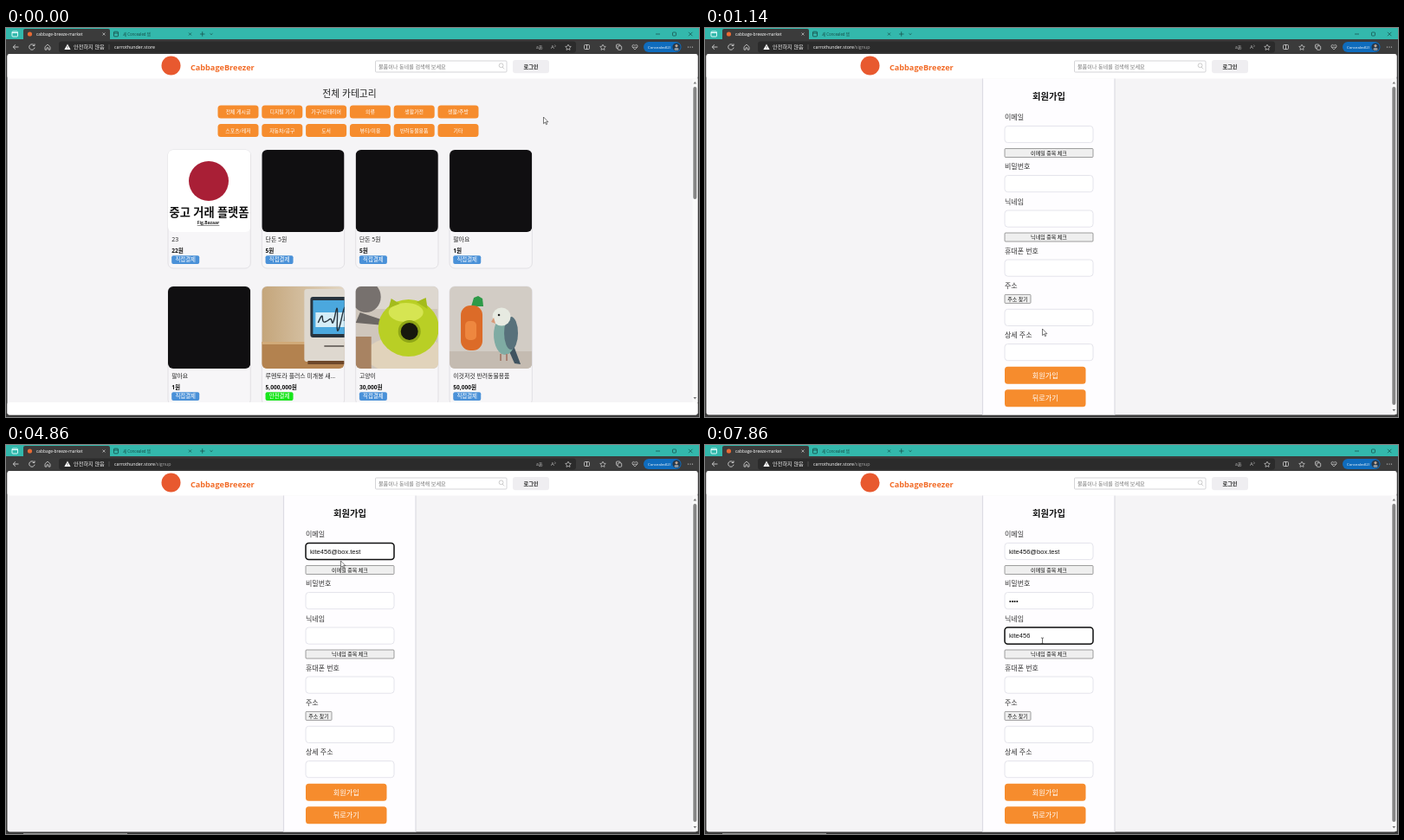
Recreate the animation shown at these times as an HTML page. Size 800 by 450 pixels, loop 8000 ms.

```html
<!DOCTYPE html>
<html lang="ko">
<head>
<meta charset="utf-8">
<title>Market sign-up</title>
<style>
html, body { margin: 0; width: 100%; height: 100%; overflow: hidden; background: #3b3b3b; }
svg { display: block; width: 100vw; height: 100vh; }
text { font-family: "Open Sans", "Noto Sans CJK KR", "Noto Sans CJK", sans-serif; white-space: pre; }
.typed text { font-family: "Liberation Sans", sans-serif; }
</style>
</head>
<body>
<svg id="stage" viewBox="0 0 800 450"></svg>
<script>
const ORANGE = '#f68c2d', BAR = '#3b3b3b', TEAL = '#33b8ac';

const rect = (x, y, w, h, fill, r = 0, more = '') =>
  `<rect x="${x}" y="${y}" width="${w}" height="${h}" fill="${fill}" rx="${r}" ${more}/>`;
const text = (x, y, size, str, fill = '#222', more = '') =>
  `<text x="${x}" y="${y}" font-size="${size}" fill="${fill}" ${more}>${str}</text>`;
const mid = (x, y, size, str, fill, more = '') => text(x, y, size, str, fill, 'text-anchor="middle" ' + more);
const line = (d, color, width = 0.8, fill = 'none') =>
  `<path d="${d}" stroke="${color}" stroke-width="${width}" fill="${fill}" stroke-linejoin="round"/>`;
const dot = (x, y, r, fill, ry = r) => `<ellipse cx="${x}" cy="${y}" rx="${r}" ry="${ry}" fill="${fill}"/>`;
const group = (id, body, more = '') => `<g id="${id}" ${more}>${body}</g>`;
const bold = 'font-weight="700"';

function browser() {
  const w = '#e4e4e4', k = '#164a46';
  const star = (x, y) => line(`M${x} ${y - 3.2}l1 2.1 2.3.3-1.7 1.6.4 2.3-2-1.1-2 1.1.4-2.3-1.7-1.6 2.3-.3z`, w, 0.6);
  return rect(0, 0, 800, 450, BAR) + rect(0, 0, 800, 13, TEAL) +
    rect(20, 1, 100, 14, BAR, 2) +
    rect(7, 4, 6.5, 6, 'none', 1, 'stroke="#e8ffff" stroke-width=".9"') + line('M7 5.5h6.5', '#e8ffff', 1) +
    dot(27.5, 7, 2.6, '#e86a35') + text(35, 8.8, 4.85, 'cabbage-breeze-market', '#fff') +
    line('M111.5 5.5l3 3m0-3l-3 3', w, 0.6) +
    rect(124.5, 4.2, 5, 5.6, 'none', 0.8, `stroke="${k}" stroke-width=".8"`) + line('M124.5 6h5', k) +
    text(135, 8.8, 4.4, '새 Concealed 탭', k) +
    line('M211 5.5l3 3m0-3l-3 3M224 7h5.5M226.7 4.2v5.5M235.5 6.3l1.5 1.4 1.5-1.4M750 7h5M788 4.8l4.4 4.4m0-4.4l-4.4 4.4', k, 0.7) +
    rect(769.5, 5, 4, 4, 'none', 0.7, `stroke="${k}" stroke-width=".7"`) +
    rect(61, 15.5, 597, 13, '#2b2b2b', 3) +
    line('M14.5 22h-6m2.5-2.7L8.2 22l2.8 2.7', w) +
    line('M32.6 20.2a3.2 3.2 0 1 0 .5 2.4M33 18.3v2.2h-2.3', w) +
    line('M45 21.8l3-2.8 3 2.8v3.3h-2v-2.3h-2v2.3h-2z', w, 0.7) +
    `<path d="M71 18.6l3.6 6.4h-7.2z" fill="#fff"/>` + line('M71 20.8v2m0 .7v.7', BAR, 0.7) +
    text(78, 24.3, 6.2, '안전하지 않음', '#eee') + line('M119 19v6', '#777', 0.5) +
    `<text x="125" y="24" font-size="5.3" fill="#fff">carrothunder.store<tspan id="path" fill="#a8a8a8"></tspan></text>` +
    text(612, 24, 5, 'aあ', '#bbb') + text(629, 24.3, 6, 'A', '#bbb') + line('M633.5 19.5q1.5 1 0 2.5', '#bbb', 0.6) +
    star(649, 22.3) + star(689, 22.3) +
    rect(667.5, 19.5, 6, 5, 'none', 1, `stroke="${w}" stroke-width=".7"`) + line('M670.5 19v6', w, 0.7) +
    rect(704.5, 19, 4.5, 4.5, 'none', 1, `stroke="${w}" stroke-width=".7"`) +
    rect(706.2, 20.8, 4.5, 4.5, BAR, 1, `stroke="${w}" stroke-width=".7"`) +
    line('M726 25l-3-3q-.6-2.6 1.6-2.6l1.4 1 1.4-1q2.2 0 1.6 2.6zM723.5 22.3h5', w, 0.6) +
    rect(736, 16, 43.5, 12, '#0f6cbd', 6) + text(741, 23.8, 4.3, 'Concealed(2)', '#fff') +
    dot(774, 22, 4.6, '#26384a') + dot(774, 20.6, 1.6, '#c3a893') + dot(774, 24.4, 2.7, '#8d98a3', 1.6) +
    [787.5, 790, 792.5].map(x => dot(x, 22, 0.6, w)).join('') +
    rect(1.5, 30, 797, 417.5, '#f5f4f6', 3);
}

function header() {
  return rect(1.5, 30, 797, 28.5, '#fff', 3) + dot(190.5, 43.5, 11, '#e8592f') +
    text(213, 48.5, 9.15, 'CabbageBreezer', '#f26c28', bold) +
    rect(426.5, 38, 151.5, 13, '#fff', 1, 'stroke="#c9c9cd" stroke-width=".8"') +
    text(430, 46.6, 6.1, '물품이나 동네를 검색해 보세요', '#777') +
    line('M573.2 45.2l2 2.2M574 43.3a2.4 2.4 0 1 1-4.8 0a2.4 2.4 0 1 1 4.8 0', '#aaa', 0.6) +
    rect(585, 37, 42, 15.2, '#efeef1', 3) + mid(606, 46.9, 6.2, '로그인', '#222', bold);
}

function scrollbar(length, bottom) {
  return rect(792.5, 58.5, 6, bottom - 58.5, '#fafafa') + rect(793.3, 68, 4, length, '#858585', 2) +
    `<path d="M793.5 64.5l1.8-2.6 1.8 2.6zM793.5 ${bottom - 6}h3.6l-1.8 2.6z" fill="#777"/>`;
}

// Each photo is drawn in its own 95 by 95 box.
const photos = {
  black: rect(0, 0, 95, 95, '#100f11'),
  logo: rect(0, 0, 95, 95, '#fff') + dot(47, 36, 23, '#a91f36') +
    mid(47.5, 76.8, 13.2, '중고 거래 플랫폼', '#111', 'font-weight="800"') +
    mid(46.5, 86, 5, 'Fig.Bazaar', '#222', bold + ' text-decoration="underline"'),
  computer: rect(0, 0, 95, 95, 'url(#wall)') + rect(0, 64, 95, 31, '#b3824f') + rect(0, 64, 50, 3, '#d1aa78') +
    rect(49, 3, 50, 84, '#ded8cf', 3) + rect(56, 12, 42, 47, '#27333e', 3) + rect(59, 16, 40, 39, '#4ba8de') +
    rect(62, 30, 36, 17, '#d5edf7') + line('M65 42q5-12 5-6t3 5 5-3 3 3 4-10 2 9 5-3 3 3', '#26323c', 1.4) +
    rect(72, 68, 23, 2, '#77716b') + rect(53, 86, 42, 4, '#6d4729'),
  house: rect(0, 0, 95, 95, '#cfc6bc') + rect(0, 0, 95, 26, '#ddd7cf') + dot(12, 12, 17, '#77716e', 18) +
    `<path d="M5 30L35 40l-2 5L0 42z" fill="#6c6764"/>` + dot(58, 79, 47, '#e1d3bb', 22) + rect(0, 58, 18, 37, '#a88362') +
    dot(61, 48, 35, '#b9cf25', 33) + dot(58, 30, 20, '#d6e552', 11) +
    `<path d="M38 25l3-11 10 6zM70 18l11-5 2 13z" fill="#a4bb1c"/>` + dot(62, 52, 13, '#8fa616', 13) + dot(62, 52, 10, '#17180d'),
  parrot: rect(0, 0, 95, 95, '#d2ccc5') + rect(0, 75, 95, 20, '#c4bbb1') +
    `<path d="M25 23l3-10 5-2 5 3 1 9z" fill="#2e9a48"/>` + rect(13, 22, 25, 52, '#dc6b28', 11) +
    rect(18, 40, 13, 22, '#ee873f', 5) + `<path d="M63 62l10 4 9 24-7-1z" fill="#3f5360"/>` +
    dot(64, 56, 13, '#7faba3', 23) + dot(71, 54, 8, '#58717b', 19) + dot(60, 35, 10.5, '#e7eae1') +
    `<path d="M51 36l-3 5 5 2z" fill="#d99a78"/>` + dot(57, 33, 1.3, '#222') + line('M59 78v8m7-8v8', '#a88072', 2)
};

function card(i, title, price, photo, pay = '직접결제', color = '#4a91d8') {
  return `<g transform="translate(${187 + i % 4 * 108.35} ${141 + (i >> 2) * 158})">` +
    rect(0, 0, 95.3, 137, '#f7f6f8', 6, 'stroke="#dcdbdf" stroke-width=".8"') +
    `<g clip-path="url(#photo)">${photos[photo]}</g>` +
    text(4.2, 106, 6.9, title) + text(4.2, 119.4, 6.6, price, '#111', bold) +
    rect(4.2, 122.3, 32, 9.6, color, 2) + mid(20.2, 129.4, 6.4, pay, '#fff') + '</g>';
}

function home() {
  const names = ['전체 게시글', '디지털 기기', '가구/인테리어', '의류', '생활가전', '생활/주방',
    '스포츠/레저', '자동차/공구', '도서', '뷰티/미용', '반려동물용품', '기타'];
  const cards = [['23', '22원', 'logo'], ['단돈 5원', '5원', 'black'], ['단돈 5원', '5원', 'black'],
    ['팔아요', '1원', 'black'], ['팔아요', '1원', 'black'],
    ['루멘토라 플러스 미개봉 새...', '5,000,000원', 'computer', '안전결제', '#18e51c'],
    ['고양이', '30,000원', 'house'], ['이것저것 반려동물용품', '50,000원', 'parrot']];
  return mid(396.5, 79.6, 10.8, '전체 카테고리', '#222', 'font-weight="500"') +
    names.map((name, i) => {
      const x = 244.5 + i % 6 * 50.8, y = i < 6 ? 89.5 : 111;
      return rect(x, y, 47, 15, ORANGE, 3.5) + mid(x + 23.5, y + 9.7, 5.9, name, '#fff');
    }).join('') +
    cards.map((c, i) => card(i, ...c)).join('') +
    rect(1.5, 433, 797, 14.5, '#fff', 2) + scrollbar(130, 433);
}

const input = (x, y) => rect(x, y, 102, 19.2, '#fff', 3.5, 'stroke="#dedde6" stroke-width=".8"');
const label = (x, y, str) => text(x, y, 8, str, '#333');
const bigButton = (x, y, str) => rect(x, y, 93.5, 20, ORANGE, 3.5) + mid(x + 46.7, y + 13, 8.1, str, '#fff');
const smallButton = (y, w, str) =>
  rect(346, y, w, 10, '#efefef', 1, 'stroke="#777" stroke-width=".7"') + mid(346 + w / 2, y + 7.3, 6, str, '#111');
const panel = (x, y, h) => rect(x, y, 152.5, h, '#fefdff', 5, 'stroke="#dddce3" stroke-width="1.2"');

function login() {
  return panel(324, 153, 227.5) + mid(400, 186.6, 10.3, '로그인 화면', '#111', bold) +
    label(349, 209.5, '아이디') + input(349, 217) + label(349, 249.8, '비밀번호') + input(349, 257.3) +
    bigButton(349, 283.5, '로그인') +
    rect(349, 309.5, 93.5, 19.5, '#fbf006', 3.5) + dot(361.3, 319.2, 4.2, '#171300') +
    mid(400.5, 322, 7.1, '라온누 로그인', '#222', 'font-weight="500"') +
    bigButton(349, 335.5, '회원 가입');
}

function signup() {
  return `<g clip-path="url(#body)">` + panel(320.5, 48, 410) + '</g>' +
    mid(397, 83.2, 10.3, '회원가입', '#111', bold) +
    [['이메일', 106], ['비밀번호', 163], ['닉네임', 203.5], ['휴대폰 번호', 260.7], ['주소', 301], ['상세 주소', 358.2]]
      .map(([s, y]) => label(346, y, s)).join('') +
    [113.4, 170.5, 211, 268, 325.3, 365.5].map(y => input(346, y)).join('') +
    smallButton(139.5, 102, '이메일 중복 체크') + smallButton(237, 102, '닉네임 중복 체크') +
    smallButton(308.4, 30, '주소 찾기') +
    bigButton(346, 391.7, '회원가입') + bigButton(346, 418.3, '뒤로가기') + scrollbar(368, 447) +
    group('ring', rect(346, 0, 102, 19.2, 'none', 3.5, 'stroke="#111" stroke-width="1.5"')) +
    group('fields', [125.6, 182.7, 223.2].map(y => text(351, y, 7.55, '', '#111')).join(''), 'class="typed"') +
    group('caret', rect(0, 0, 0.8, 9, '#111'));
}

function dialog() {
  return rect(306.5, 29.5, 187, 52.5, '#4a4a4b', 3.5, 'style="filter:drop-shadow(0 2px 4px #0008)"') +
    text(313.5, 42, 5.7, 'carrothunder.store의 메시지', '#fff', bold) +
    text(313.5, 53.6, 5.9, '사용가능한 이메일 입니다!', '#f2f2f2') +
    rect(460, 62, 27, 13, '#0f6cbd', 2) + mid(473.5, 70.6, 5.8, '확인', '#fff');
}

const pointers = {
  arrow: line('M0 0v7.6l1.8-1.6 1.3 2.7 1.1-.5-1.2-2.6h2.4z', '#222', 0.6, '#fff'),
  hand: line('M-1 .5q1-1 1.7 0v3l3 .7q1.2.4 1 1.8L4 9.4H.5L-2 6q-.3-1.3 1-.6z', '#222', 0.6, '#fff'),
  beam: line('M-1.6-3.4h1.2l.4.4.4-.4h1.2M0-3v6M-1.6 3.4h1.2L0 3l.4.4h1.2', '#333', 0.7)
};

document.getElementById('stage').innerHTML = `<defs>
  <clipPath id="photo"><rect width="95.3" height="95" rx="6"/></clipPath>
  <clipPath id="body"><rect y="58.5" width="800" height="389"/></clipPath>
  <linearGradient id="wall"><stop stop-color="#c4a57a"/><stop offset="1" stop-color="#e2d6c3"/></linearGradient></defs>` +
  browser() + header() + group('home', home()) + group('login', login()) + group('signup', signup()) +
  group('dialog', dialog()) +
  group('status', rect(0, 438.8, 60.5, 9, TEAL, 1) + text(3, 444.9, 4.7, 'carrothunder.store/login', '#0e302d')) +
  group('edge', rect(20, 449, 120, 1, '#999')) +
  Object.entries(pointers).map(([id, body]) => group(id, body)).join('');

const el = id => document.getElementById(id);
const show = (id, on) => { el(id).style.display = on ? '' : 'none'; };
const within = (n, a, b) => n >= a && n < b;
// Last value whose start step has been reached; steps are pairs of [start, value].
const at = (steps, n) => steps.reduce((v, s) => n >= s[0] ? s[1] : v, 0);

// Pointer keys: step, x, y, shape; an empty shape hides it.
const moves = [[0, 620.5, 103, 'arrow'], [1, 611, 65, 'arrow'], [2, 604, 46, 'hand'], [3, 582.5, 54.5, 'hand'],
  [4, 500, 170, 'arrow'], [6, 395, 343, 'hand'], [7, 389.5, 348, 'hand'], [8, 389.5, 348, 'arrow'],
  [10, 389.5, 345, 'arrow'], [14, 371, 130, 'beam'], [15, 369, 126.5, 'beam'], [21, 369, 126.5, ''],
  [34, 386.5, 134, 'arrow'], [35, 393, 143, 'arrow'], [36, 393, 143, 'arrow'], [39, 475, 66, 'arrow'],
  [40, 475, 66, 'arrow'], [41, 442, 76, 'arrow'], [42, 405, 140, 'arrow'], [43, 388, 180, 'beam'],
  [44, 388, 180, ''], [46, 389.5, 226.5, 'beam'], [47, 389.5, 226.5, ''], [54, 389.5, 226.5, 'beam']];

const typing = [
  ['kite456@box.test', [[21, 1], [22, 4], [24, 5], [25, 7], [26, 8], [28, 10], [29, 12], [30, 14], [31, 16]]],
  ['••••', [[44, 2], [45, 4]]],
  ['kite456', [[49, 2], [50, 4], [52, 7]]]
];

function draw(n) {
  const page = n < 3 ? 'home' : n < 8 ? 'login' : 'signup';
  for (const id of ['home', 'login', 'signup']) show(id, id === page);
  el('path').textContent = page === 'home' ? '' : '/' + page;
  show('status', within(n, 2, 5));
  show('dialog', within(n, 36, 41));
  show('edge', n >= 16);

  const fields = [...el('fields').children];
  fields.forEach((f, i) => { f.textContent = typing[i][0].slice(0, at(typing[i][1], n)); });
  const focus = within(n, 15, 36) ? 0 : within(n, 43, 46) ? 1 : n >= 46 ? 2 : -1;
  show('ring', focus >= 0);
  show('caret', within(n, 15, 18) || within(n, 20, 31) || within(n, 47, 54));
  if (focus >= 0) {
    const y = [113.4, 170.5, 211][focus];
    el('ring').setAttribute('transform', `translate(0 ${y})`);
    const x = 351 + (fields[focus].textContent ? fields[focus].getComputedTextLength() : 0);
    el('caret').setAttribute('transform', `translate(${x} ${y + 5})`);
  }

  const i = moves.findLastIndex(m => n >= m[0]);
  const a = moves[i], b = moves[i + 1] || a;
  const k = a[3] && b !== a ? (n - a[0]) / (b[0] - a[0]) : 0;
  for (const id in pointers) show(id, id === a[3]);
  if (a[3]) el(a[3]).setAttribute('transform', `translate(${a[1] + (b[1] - a[1]) * k} ${a[2] + (b[2] - a[2]) * k})`);
}

const start = performance.now();
function tick() {
  const ms = (performance.now() - start) % 8000;
  draw(Math.min(55, Math.floor((ms + 5) * 7 / 1000)));
  requestAnimationFrame(tick);
}
tick();
</script>
</body>
</html>
```
